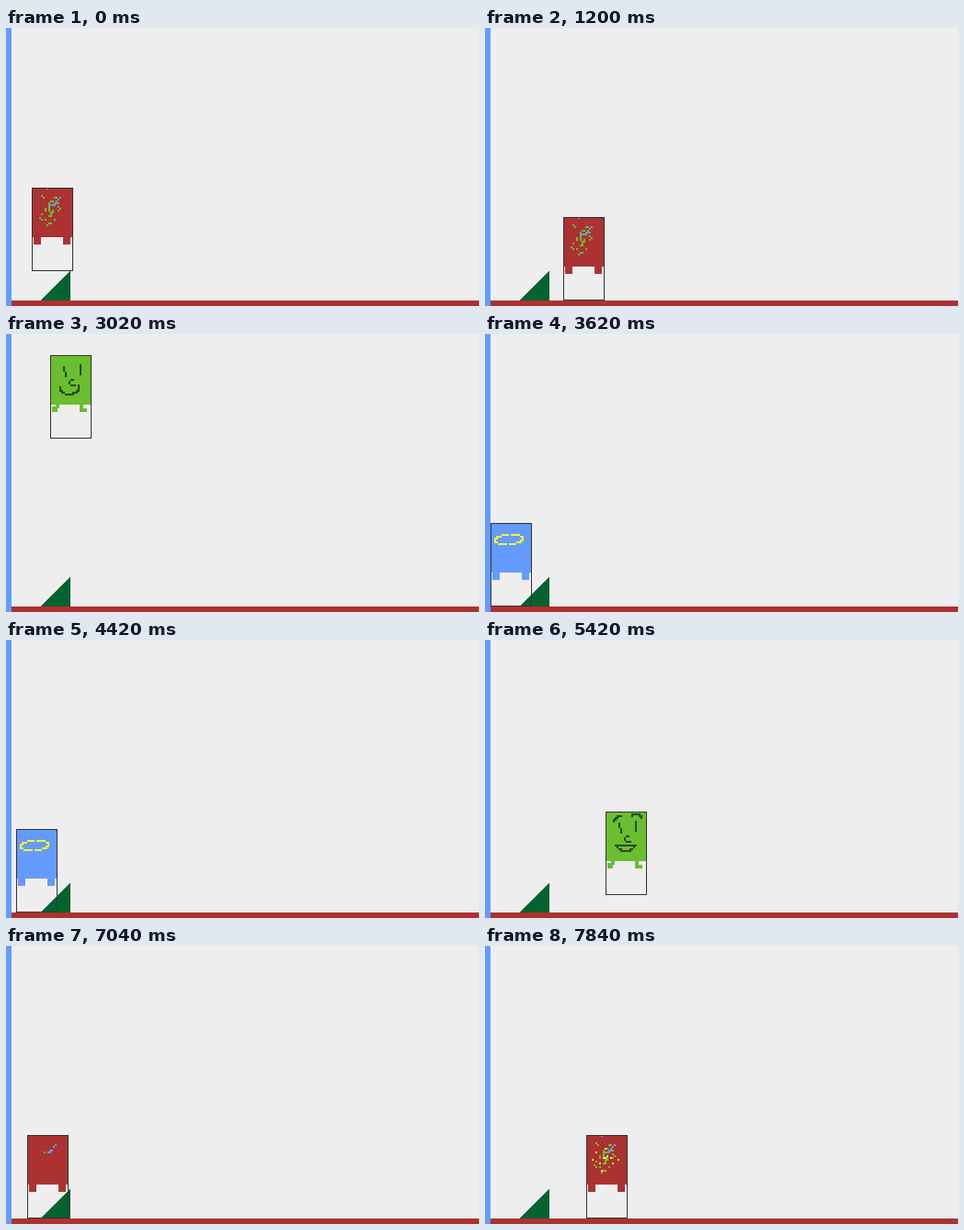
An HTML page with a canvas that plays this animation: 514 by 303 pixels, repeating every 8000 ms.

```html
<!DOCTYPE html>
<html lang="en">
<head>
<meta charset="utf-8">
<title>Jumping block</title>
<style>
html, body { margin: 0; width: 100%; height: 100%; overflow: hidden; background: #eee; }
canvas { display: block; }
</style>
</head>
<body>
<canvas width="514" height="303"></canvas>
<script>
const ctx = document.querySelector('canvas').getContext('2d');
const { PI } = Math;
const LOOP = 8000, STEP = 201, LAST_STEP = 39;
const GROUND = 206, LEDGE = 174, GRAVITY = 38.75;
const RED = '#ac3232', GREEN = '#6abe30', BLUE = '#639bff', YELLOW = '#fbf236', INK = '#264b12';

// Turning points of the walk as [step, x] and peaks of the jumps as [step, y]
const turns = [[0, 28], [3, 335], [6, 85], [10, 10], [15, 48], [18, 6], [22, 11],
  [24, 30], [27, 131], [30, 26], [35, 23], [LAST_STEP, 110]];
const jumps = [[0, LEDGE], [8.3, 37], [15, 23], [20, LEDGE], [29, 32], [37, 68]];

function position(step) {
  const next = Math.max(1, turns.findIndex(turn => turn[0] >= step));
  const [s1, x1] = turns[next - 1], [s2, x2] = turns[next];
  const x = x1 + (x2 - x1) * (step - s1) / (s2 - s1);
  const y = Math.min(GROUND, ...jumps.map(([peak, top]) => top + GRAVITY * (step - peak) ** 2));
  return [Math.round(x), Math.round(y)];
}

function rect(color, x, y, w, h) {
  ctx.fillStyle = color;
  ctx.fillRect(x, y, w, h);
}

// The sprite is drawn in 2 px cells
function dot(color, x, y) {
  rect(color, 2 * Math.round(x / 2), 2 * Math.round(y / 2), 2, 2);
}

function arc(color, cx, cy, rx, ry, from = 0, to = 2 * PI, skew = 0) {
  for (let i = 0; i <= 40; i++) {
    const a = from + (to - from) * i / 40;
    dot(color, cx + rx * Math.cos(a), cy + ry * Math.sin(a) - skew * Math.cos(a));
  }
}

function drawBrows(thickness) {
  for (let i = 0; i < thickness; i++) {
    arc(INK, 16, 10 + 2 * i, 8, 6, PI, 1.5 * PI);
    arc(INK, 32, 6 + 2 * i, 6, 4, 1.2 * PI, 2 * PI);
  }
}

const moods = [
  function tongueOut() {
    drawBrows(2);
    arc(INK, 21, 36, 11, 3);
    arc(INK, 20, 38, 9, 4, 0, PI);
    for (let i = 0; i < 6; i++) {
      for (let j = 0; j < 3; j++) {
        if ((i + j) % 3) dot(RED, 22 + 2 * i + 2 * j, 42 + 2 * i - 2 * j);
      }
    }
  },
  function smile() {
    arc(INK, 20, 34, 10, 8, -0.2, PI);
  },
  function openMouth() {
    drawBrows(1);
    arc(INK, 21, 35, 11, 1, 0, PI);
    arc(INK, 21, 36, 9, 6, 0, PI);
  }
];

function drawFace(mood) {
  for (let i = 0; i < 6; i++) {
    dot(INK, i < 3 ? 14 : 16, 12 + 2 * i);
    dot(INK, 32, 10 + 2 * i);
  }
  arc(INK, 24, 29, 4, 3, 0.3 * PI, 1.5 * PI);
  mood();
}

function speckle(color, count, cx, cy, rx, ry, seed) {
  const random = () => (seed = seed * 16807 % 2147483647) / 2147483647;
  for (let i = 0; i < count; i++) {
    const angle = 2 * PI * random(), reach = random();
    dot(color, cx + rx * reach * Math.cos(angle), cy + ry * reach * Math.sin(angle));
  }
}

function drawFeet(color, airborne) {
  if (airborne) {
    rect(color, 6, 54, 4, 4);
    rect(color, 2, 56, 6, 6);
    rect(color, 32, 54, 4, 4);
    rect(color, 32, 58, 8, 4);
  } else {
    rect(color, 2, 54, 8, 8);
    rect(color, 34, 54, 8, 8);
  }
}

function drawBlock(step) {
  const [x, y] = position(step);
  const airborne = y !== GROUND && y !== LEDGE;
  const color = airborne ? GREEN : x < 16 ? BLUE : RED;

  ctx.save();
  ctx.translate(x, y);
  rect(color, 1, 1, 43, 53);
  drawFeet(color, airborne);

  if (color === GREEN) {
    drawFace(moods[Math.min(2, Math.floor(step / 12))]);
  } else if (color === BLUE) {
    arc(YELLOW, 19, 17, 15, 5, 0, 2 * PI, 1);
  } else {
    const calm = step >= 28 && step < 36;
    if (!calm) speckle(GREEN, 38, 19, 22, 12, 22, 417);
    if (step >= 36) speckle(YELLOW, 14, 19, 25, 15, 16, 91);
    speckle(BLUE, 11, 23, 16, 9, 8, 2024);
  }

  ctx.strokeStyle = '#333';
  ctx.strokeRect(0.5, 0.5, 44, 90);
  ctx.restore();
}

function drawStage() {
  rect('#eee', 0, 0, 514, 303);
  rect(BLUE, 0, 0, 6, 303);
  rect(RED, 6, 297, 508, 6);
  for (let i = 0; i < 32; i++) rect('#05632f', 69 - i, 265 + i, i + 1, 1);
}

function frame() {
  const time = performance.now() % LOOP;
  drawStage();
  drawBlock(Math.min(LAST_STEP, Math.floor((time + 11) / STEP)));
  requestAnimationFrame(frame);
}
frame();
</script>
</body>
</html>
```
